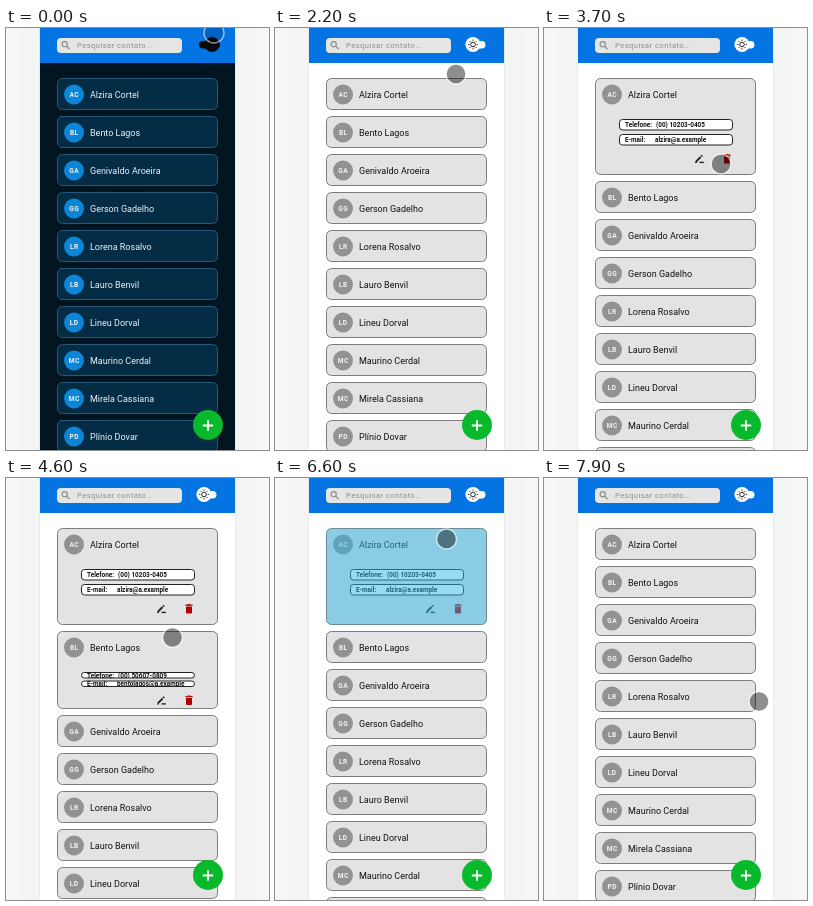
An HTML page with a canvas that plays this animation: 263 by 422 pixels, repeating every 8 s.

```html
<!DOCTYPE html>
<html lang="pt">
<head>
<meta charset="utf-8">
<style>
  html, body { margin: 0; width: 100%; height: 100%; overflow: hidden; background: #f6f8f8; }
  canvas { display: block; }
</style>
</head>
<body>
<canvas id="stage" width="263" height="422"></canvas>
<script>
const ctx = document.getElementById('stage').getContext('2d');
const FONT = 'Roboto, Arial, sans-serif';
const LOOP = 8000;

const contacts = [
  { name: 'Alzira Cortel', phone: '(00) 10203-0405', mail: 'alzira@a.example',
    open: 2800, close: 6600, end: 7300, tap: 6500 },
  { name: 'Bento Lagos', phone: '(00) 50607-0809', mail: 'bentolagos@a.example',
    open: 4400, close: 5700, end: 6300, tap: 5700 },
  ...['Genivaldo Aroeira', 'Gerson Gadelho', 'Lorena Rosalvo', 'Lauro Benvil',
    'Lineu Dorval', 'Maurino Cerdal', 'Mirela Cassiana', 'Plínio Dovar'].map(name => ({ name }))
];

// Pointer moves: start, end, x, y
const moves = [
  [200, 300, 199, 16], [1800, 1900, 186, 37], [2100, 2200, 181, 46], [2200, 2400, 185, 59],
  [3200, 3300, 194, 69], [3400, 3700, 177, 136], [3900, 4100, 166.5, 159.5],
  [5900, 6300, 172, 66], [6400, 6500, 171.5, 61], [6800, 7000, 181, 60], [7600, 7900, 215, 223.5]
];

const ramp = (t, a, b) => Math.min(1, Math.max(0, (t - a) / (b - a)));
const smooth = u => u * u * (3 - 2 * u);
const mix = (a, b, u) => a + (b - a) * u;
const blend = (a, b, u) => `rgb(${a.map((v, i) => Math.round(mix(v, b[i], u)))})`;

function box(x, y, w, h, r, fill, stroke) {
  ctx.beginPath();
  ctx.roundRect(x, y, w, h, r);
  if (fill) { ctx.fillStyle = fill; ctx.fill(); }
  if (stroke) { ctx.strokeStyle = stroke; ctx.lineWidth = 1; ctx.stroke(); }
}

function disc(x, y, r, fill) {
  ctx.beginPath();
  ctx.arc(x, y, r, 0, 7);
  ctx.fillStyle = fill;
  ctx.fill();
}

function line(color, width, ...segments) {
  ctx.beginPath();
  for (const [x1, y1, x2, y2] of segments) { ctx.moveTo(x1, y1); ctx.lineTo(x2, y2); }
  ctx.strokeStyle = color;
  ctx.lineWidth = width;
  ctx.stroke();
}

function text(str, x, y, font, color, align = 'left', spacing = 0) {
  ctx.font = `${font} ${FONT}`;
  ctx.letterSpacing = spacing + 'px';
  ctx.textAlign = align;
  ctx.fillStyle = color;
  ctx.fillText(str, x, y);
}

function row(y, h, label, value, x) {
  box(75.5, y, 113, h, Math.min(3, h / 2), '#fff', '#222');
  ctx.save();
  ctx.beginPath();
  ctx.rect(76, y, 112, h);
  ctx.clip();
  text(label, 81, y + h / 2 + 2.3, 'bold 6.4px', '#111');
  text(value, x, y + h / 2 + 2.3, 'bold 6.4px', '#111');
  ctx.restore();
}

function editIcon(x, y) {
  line('#222', 1.9, [x - 3.2, y + 2.8, x + 1.6, y - 2]);
  line('#222', 2, [x + 2.2, y - 2.6, x + 3.2, y - 3.6]);
  line('#222', 1, [x - 4, y + 3.6, x - 2, y + 3.4]);
  line('#222', 1.4, [x + .5, y + 3.4, x + 4.8, y + 3.4]);
}

function trashIcon(x, y) {
  const red = '#b00000';
  box(x - 3, y - 2.5, 6, 7, [0, 0, 1, 1], red);
  box(x - 3.7, y - 4.4, 7.4, 1.2, 0, red);
  box(x - 1.5, y - 5, 3, 1, 0, red);
}

function card(c, y, t, theme, fast) {
  const shown = c.open && t >= c.open && t < c.end;
  const p = shown ? smooth(ramp(t, c.open, c.open + 400)) * (1 - smooth(ramp(t, c.close, c.close + 400))) : 0;
  const h = shown ? 59 + 38 * p : 32;
  const outline = [51.5, y + .5, 160, h - 1, 5];
  box(...outline, blend([4, 44, 68], [227, 227, 227], theme), blend([38, 88, 122], [125, 125, 125], theme));
  disc(68, y + 16.5, 10, blend([14, 134, 216], [146, 146, 146], fast));
  const initials = c.name.split(' ').map(w => w[0]).join('');
  text(initials, 68.2, y + 18.9, 'bold 6.6px', '#f4f4f4', 'center', .4);
  text(c.name, 84, y + 20, '9px', blend([238, 242, 245], [17, 17, 17], fast));
  if (shown) {
    const rowH = .5 + 10 * p;
    row(y + 41.5, rowH, 'Telefone:', c.phone, 112);
    row(y + 43.5 + 13 * p, rowH, 'E-mail:', c.mail, 111);
    editIcon(155, y + 58 + 23 * p);
    trashIcon(183, y + 58 + 23 * p);
  }
  if (c.tap && t >= c.tap && t < c.close + 200) {
    box(...outline, `rgba(51,181,229,${.5 * (1 - ramp(t, c.close, c.close + 200))})`);
  }
  return h;
}

function toggle(fast) {
  const x = mix(206, 198, fast);
  const tone = blend([8, 10, 14], [255, 255, 255], fast);
  box(mix(193, 195, fast), 13, mix(21, 15.5, fast), 7.5, 3.7, tone);
  disc(x, 16.5, 7.6, tone);
  if (fast < .5) return;
  ctx.beginPath();
  ctx.arc(x, 16.5, 2.3, 0, 7);
  ctx.strokeStyle = '#222';
  ctx.lineWidth = 1;
  ctx.stroke();
  line('#222', .9, ...Array.from({ length: 8 }, (_, i) => {
    const cx = Math.cos(i * Math.PI / 4), cy = Math.sin(i * Math.PI / 4);
    return [x + 3.6 * cx, 16.5 + 3.6 * cy, x + 5 * cx, 16.5 + 5 * cy];
  }));
}

function header(fast) {
  box(34, 0, 195, 35, 0, '#0474e2');
  box(51, 10, 125, 15, 4, '#e5e5e5');
  ctx.beginPath();
  ctx.arc(58.7, 16.2, 2.6, 0, 7);
  ctx.strokeStyle = '#8a8a8a';
  ctx.lineWidth = 1.1;
  ctx.stroke();
  line('#8a8a8a', 1.3, [60.6, 18.1, 63.6, 21.1]);
  text('Pesquisar contato...', 71, 20, '7.5px', '#8c8c8c', 'left', .5);
  toggle(fast);
}

function pointer(t) {
  let x = 208, y = 5;
  for (const [a, b, tx, ty] of moves) {
    const u = ramp(t, a, b);
    x = mix(x, tx, u);
    y = mix(y, ty, u);
  }
  disc(x, y, 9.5, `rgba(0,0,0,${t < 300 ? .15 : .44})`);
  ctx.beginPath();
  ctx.arc(x, y, 10, 0, 7);
  ctx.strokeStyle = 'rgba(255,255,255,.55)';
  ctx.lineWidth = 1.5;
  ctx.stroke();
}

function draw(t) {
  const theme = smooth(ramp(t, 920, 1600));
  const fast = Math.min(1, theme * 1.6);
  box(0, 0, 263, 422, 0, '#f6f8f8');
  box(14, 0, 235, 422, 0, '#f3f5f5');
  box(33, 0, 197, 422, 0, '#e9ebeb');
  box(34, 0, 195, 422, 0, blend([3, 21, 32], [255, 255, 255], fast));
  header(fast);
  let y = 50;
  for (const c of contacts) y += card(c, y, t, theme, fast) + 6;
  disc(202, 397, 15, '#08b92b');
  line('#fff', 1.8, [196.8, 397.5, 207.2, 397.5], [202, 392.3, 202, 402.7]);
  pointer(t);
}

function frame(now) {
  draw(Math.floor(now % LOOP / 100) * 100);
  requestAnimationFrame(frame);
}
requestAnimationFrame(frame);
</script>
</body>
</html>
```
